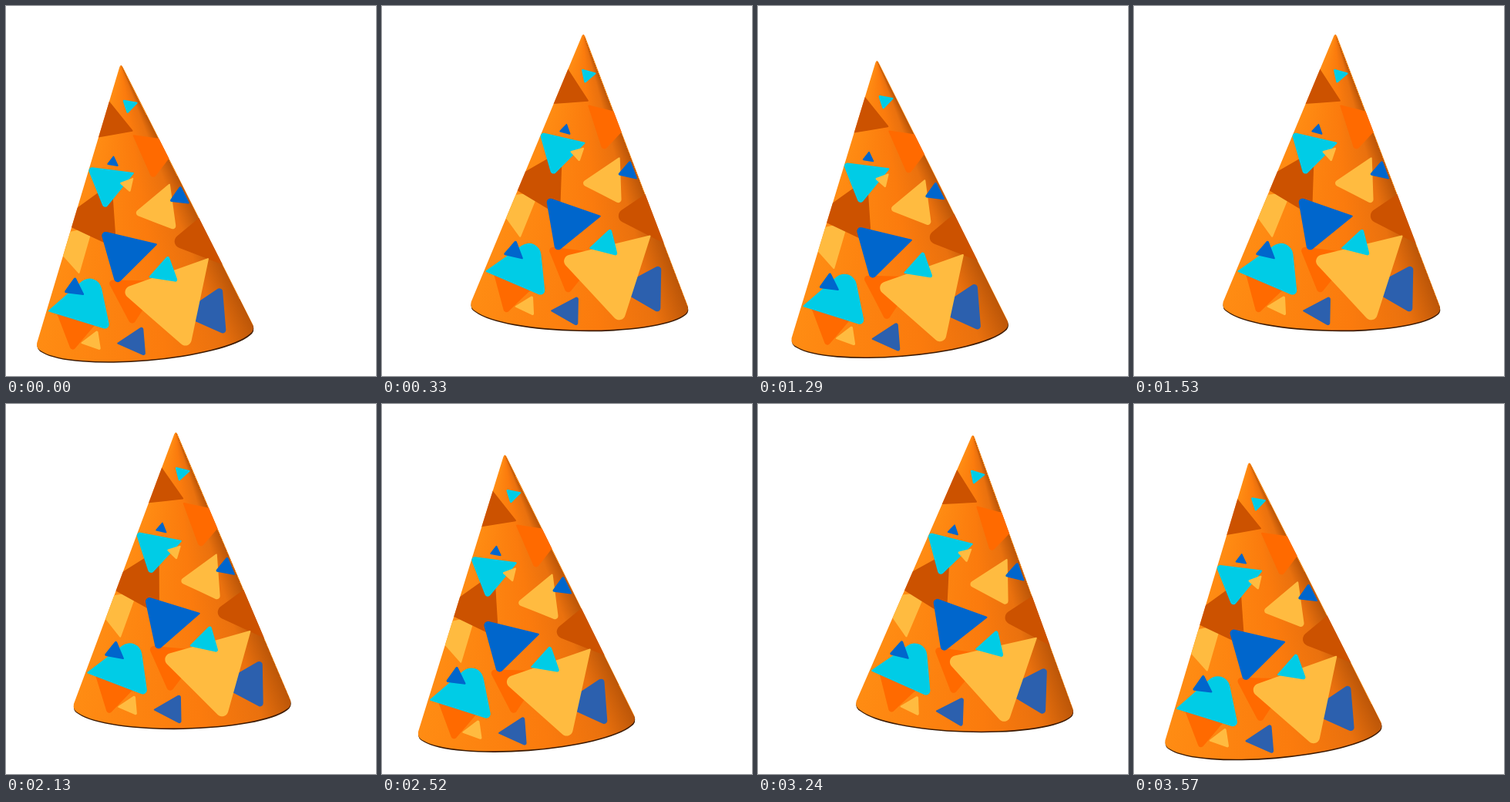
Animation of 480 by 480 pixels, one loop 3600 ms. Source, as an HTML page with a canvas:

```html
<!DOCTYPE html>
<html lang="en">
<head>
<meta charset="utf-8">
<title>Party hat</title>
<style>
html, body { margin: 0; width: 100%; height: 100%; overflow: hidden; background: #fff; }
canvas { display: block; }
</style>
</head>
<body>
<canvas id="stage" width="480" height="480"></canvas>
<script>
const ctx = document.getElementById('stage').getContext('2d');
const CYAN = '#00cce6', YELLOW = '#ffbb40', BROWN = '#cc5200', ORANGE = '#ff6a00';
const BLUE = '#0066cc', NAVY = '#2c60ae';
const SWING = 600, STEP = 30, DEG = Math.PI / 180;

// Isosceles confetti triangle: sharp tip at (x, y), rounded base lying in the
// direction of angle. firstRound changes the rounding of one base corner.
function tri(color, x, y, side, angle, firstRound) {
  const round = 0.07 * side, height = 0.888 * side, half = 0.46 * side;
  ctx.save();
  ctx.translate(x, y);
  ctx.rotate(angle * DEG);
  ctx.beginPath();
  ctx.moveTo(height + round / 2, 0);
  ctx.arcTo(height + round / 2, half + round * 0.87, 0, 0, round);
  ctx.arcTo(-1, 0, height, -half, 1);
  ctx.arcTo(height + round / 2, -half - round * 0.87, height + round / 2, 0, firstRound ?? round);
  ctx.closePath();
  ctx.fillStyle = color;
  ctx.fill();
  ctx.restore();
}

// Cone with its tip at the origin, lit from the left.
const cone = new Path2D('M-3 5Q0 -4 3 5L142 350Q144 358 137 362A141 31 0 0 1 -133 362Q-141 358 -139 350Z');
const shade = ctx.createConicGradient(68 * DEG, 0, 0);
shade.addColorStop(0, '#bc5608');
shade.addColorStop(0.018, '#ea710e');
shade.addColorStop(0.05, '#fb7b0d');
shade.addColorStop(0.122, '#ff8c13');

function drawHat() {
  ctx.save();
  ctx.translate(0.3, 1.6);
  ctx.fillStyle = '#3c1a00';
  ctx.fill(cone);
  ctx.restore();
  ctx.fillStyle = shade;
  ctx.fill(cone);
  ctx.clip(cone);

  tri(BROWN, -24, 39, 55, 85, 1);
  tri(ORANGE, 8, 92, 60, 42);
  tri(BROWN, 112, 270, 74, 235, 9);
  tri(YELLOW, -77, 265, 60, 262);
  tri(BROWN, -25, 152, 80, 120);
  tri(ORANGE, 28, 284, 66, 157);
  tri(ORANGE, -111, 309, 56, 45);

  tri(CYAN, 17.5, 50.5, 19, 167);
  tri(BLUE, -14.5, 130.5, 14.4, 222);
  tri(CYAN, 5, 141, 58, 163);
  tri(YELLOW, 3.5, 147.5, 18, 136);
  tri(YELLOW, 50, 159, 58, 116);
  tri(BLUE, 73, 186.5, 24.6, 220);
  tri(BLUE, 27, 235.5, 71.6, 169);
  tri(NAVY, 49.5, 328.7, 62, 0);
  tri(YELLOW, 92, 259.5, 116, 136);
  tri(CYAN, 13, 277.5, 36.4, -15);
  tri(CYAN, -121, 310, 80, -7, 16);
  tri(BLUE, -73, 293, 25, 220);
  tri(YELLOW, -82, 355, 26, -4);
  tri(NAVY, -35.5, 359.5, 38.6, 0);
}

const ease = u => u < 0.5 ? (2 * u) ** 2.4 / 2 : 1 - (2 - 2 * u) ** 2.4 / 2;

// Side position from -1 (left) to 1 (right).
function swing(time) {
  const phase = time / SWING % 2;
  return 2 * ease(phase < 1 ? phase : 2 - phase) - 1;
}

function frame() {
  const side = swing(Math.floor((performance.now() + 1) / STEP) * STEP);
  const square = side * side;
  ctx.clearRect(0, 0, 480, 480);
  ctx.save();
  ctx.translate(240.8 + 91.7 * side, 35 + 41.5 * square * (0.7 + 0.3 * square));
  ctx.rotate(4.85 * side * DEG);
  drawHat();
  ctx.restore();
  requestAnimationFrame(frame);
}
frame();
</script>
</body>
</html>
```
